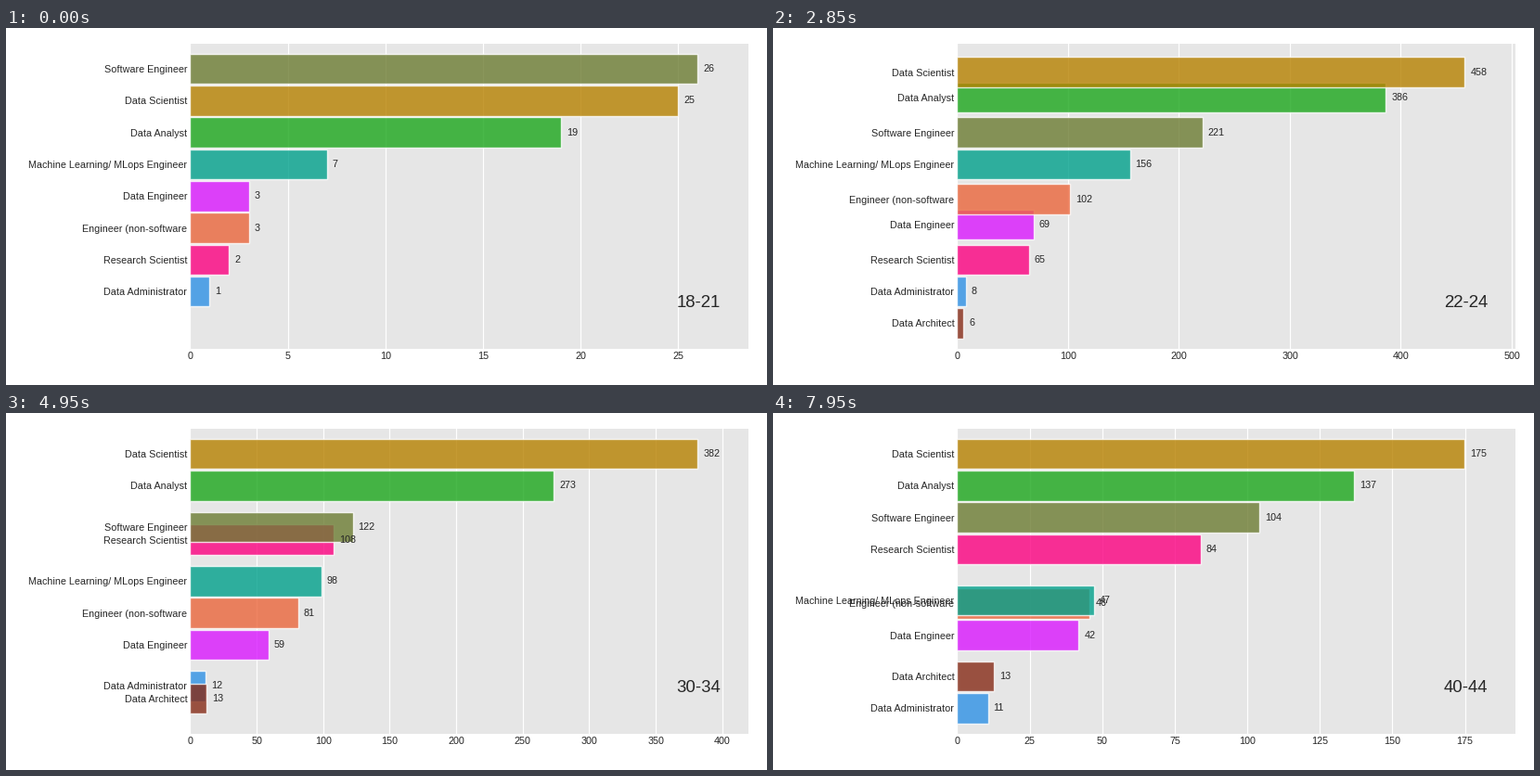
Write a matplotlib script that moves like this. It is 820 px wide and 385 px high and loops after 8 s.

```python
import matplotlib.pyplot as plt
import numpy as np
from matplotlib.animation import FuncAnimation

WIDTH, HEIGHT, DPI = 820, 385, 112
LEFT, RIGHT, TOP, BOTTOM = 198.42, 800, 16.77, 345.77
LOOP_MS, TICK_MS, STEP_MS = 8000, 50, 150
STEPS_PER_PERIOD = 10
INK = "0.15"
SMALL, LARGE = 6.93, 12

PERIODS = ["18-21", "22-24", "25-29", "30-34", "35-39", "40-44", "45-49"]

# Job title: (bar colour, count in each age group)
JOBS = {
    "Data Administrator": ("#2E91E5", [1, 4, 8, 11, 14, 10, 12]),
    "Data Analyst": ("#1CA71C", [19, 209, 406, 296, 220, 157, 90]),
    "Data Architect": ("#862A16", [np.nan, 2, 6, 9, 21, 11, 17]),
    "Data Engineer": ("#DA16FF", [3, 51, 71, 62, 51, 47, 30]),
    "Data Scientist": ("#B68100", [25, 184, 488, 408, 320, 204, 107]),
    "Engineer (non-software": ("#EB663B", [3, 37, 109, 83, 77, 52, 31]),
    "Machine Learning/ MLops Engineer": ("#00A08B", [7, 90, 163, 106, 81, 55, 29]),
    "Research Scientist": ("#FC0080", [2, 27, 69, 107, 111, 92, 65]),
    "Software Engineer": ("#6C7C32", [26, 169, 227, 136, 90, 112, 86]),
}
names = np.array(list(JOBS))
colors = [color for color, _ in JOBS.values()]
counts = np.array([values for _, values in JOBS.values()], dtype=float).T
n_bars = len(names)


def positions(row):
    """Bar positions for one period: largest on top, missing values stay NaN."""
    order = np.argsort(-row, kind="stable")
    place = np.empty(n_bars)
    place[order] = np.arange(n_bars, 0, -1)
    return np.where(np.isnan(row), np.nan, place)


ranks = np.array([positions(row) for row in counts])


def between(table, step):
    period, part = divmod(step, STEPS_PER_PERIOD)
    if part == 0:
        return table[period]
    share = part / STEPS_PER_PERIOD
    return table[period] * (1 - share) + table[period + 1] * share


plt.rcParams["font.family"] = "Liberation Sans"
plt.rcParams["text.color"] = INK

fig = plt.figure(figsize=(WIDTH / DPI, HEIGHT / DPI), dpi=DPI, facecolor="white")
ax = fig.add_axes([LEFT / WIDTH, 1 - BOTTOM / HEIGHT,
                   (RIGHT - LEFT) / WIDTH, (BOTTOM - TOP) / HEIGHT])
ax.set_facecolor("0.9")
ax.set_axisbelow(True)
ax.grid(True, axis="x", color="white", linewidth=0.75)
ax.tick_params(length=0, pad=2, labelsize=SMALL, labelcolor=INK)
ax.spines[:].set_visible(False)
ax.xaxis.set_major_formatter("{x:,.0f}")

bars = ax.barh(np.arange(1, n_bars + 1), np.ones(n_bars), height=0.95,
               color=colors, edgecolor="white", linewidth=0.9, alpha=0.8)
labels = [ax.text(0, 0, "", size=SMALL, ha="left", va="center") for _ in names]
period_label = ax.text(0.95, 0.15, "", size=LARGE, ha="right", va="center",
                       transform=ax.transAxes)
ax.set_ylim(0.2, n_bars + 0.8)


def draw(frame):
    step = frame * TICK_MS // STEP_MS
    values, places = between(counts, step), between(ranks, step)
    shown = ~np.isnan(values)
    x_max = 1.1 * np.nanmax(values)
    ax.set_xlim(0, x_max)
    ax.set_yticks(places[shown], names[shown])

    for bar, label, value, place, visible in zip(bars, labels, values, places, shown):
        bar.set_visible(visible)
        label.set_visible(visible)
        if visible:
            bar.set_width(value)
            bar.set_y(place - bar.get_height() / 2)
            label.set_position((value + 0.01 * x_max, place))
            label.set_text(f"{value:,.0f}")

    period_label.set_text(PERIODS[step // STEPS_PER_PERIOD])
    return [*bars, *labels, period_label]


anim = FuncAnimation(fig, draw, frames=LOOP_MS // TICK_MS, interval=TICK_MS,
                     repeat=True, repeat_delay=0, blit=False)
plt.show()
```
